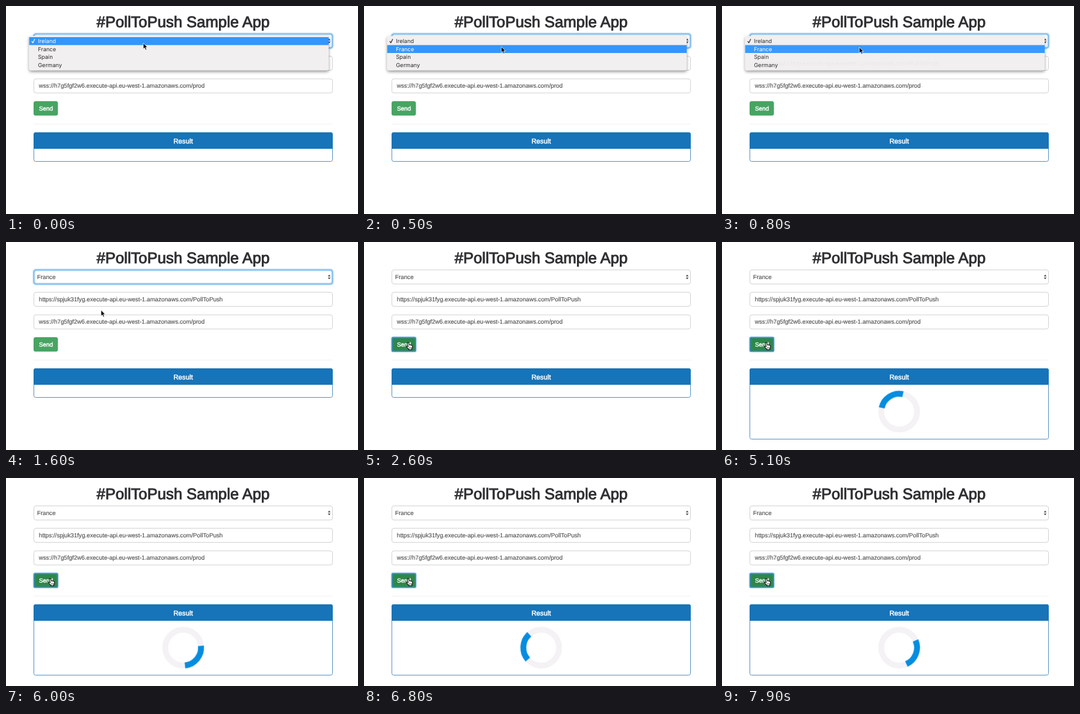
Write an HTML page that moves like this. It is 600 by 354 pixels and loops after 8000 ms.

```html
<!DOCTYPE html>
<html lang="en">
<head>
<meta charset="utf-8">
<title>Sample app</title>
<style>
html, body { margin: 0; width: 100%; height: 100%; overflow: hidden; background: #fff; }
svg { display: block; width: 600px; height: 354px; }
text {
  font: 10.13px "Liberation Sans", Arial, sans-serif; text-rendering: geometricPrecision;
  fill: #4a4a4a; stroke: #4a4a4a; stroke-width: .12px;
}
.title { font-size: 26.25px; fill: #303033; stroke: #303033; stroke-width: 1px; text-anchor: middle; }
.head { font-size: 11.7px; fill: #fff; stroke: #fff; stroke-width: .5px; text-anchor: middle; }
.send { fill: #fff; stroke: #fff; stroke-width: .45px; }
.field { fill: #fff; stroke: #d0d0d0; }
.menu text { font: 9.5px Inter, "Open Sans", sans-serif; fill: #2b2b2b; stroke: none; }
.menu .lit text { fill: #fff; }
.lit rect { fill: #3296fb; }
.lit path { stroke: #fff; }
.tick { fill: none; stroke: #2b2b2b; stroke-width: 1.3; }

/* one-time switches within the 8 s loop */
.step { animation: 8s step-end infinite; }
.ireland { animation-name: ireland; }
.france { animation-name: france; }
.focus { animation-name: focus; }
.hover, .hand { animation-name: enter; }
.arrow { animation-name: leave; }
.ring { animation-name: ring; }
.busy { animation-name: busy; }
@keyframes ireland { 0% { opacity: 1 } 5% { opacity: 0 } to { opacity: 0 } }
@keyframes france { 0% { opacity: 0 } 5% { opacity: 1 } to { opacity: 1 } }
@keyframes focus { 0% { opacity: 1 } 28.75% { opacity: 0 } to { opacity: 0 } }
@keyframes enter { 0% { opacity: 0 } 24.5% { opacity: 1 } to { opacity: 1 } }
@keyframes leave { 0% { opacity: 1 } 24.5% { opacity: 0 } to { opacity: 0 } }
@keyframes ring { 0% { opacity: 0 } 28.75% { opacity: 1 } to { opacity: 1 } }
@keyframes busy { 0% { opacity: 0 } 41.04% { opacity: 1 } to { opacity: 1 } }

.menu { animation: close 8s linear infinite; }
@keyframes close { 0%, 9% { opacity: 1 } 10% { opacity: .96 } 11% { opacity: .9 } 13.75%, to { opacity: 0 } }

.cursor { animation: move 8s ease-in-out infinite; }
@keyframes move {
  0%, 2.5% { transform: translate(234px, 63px) }
  7.5%, 15% { transform: translate(234px, 70px) }
  25.6%, to { transform: translate(75px, 171px) }
}

.arc { transform-origin: 302px 288.7px; animation: spin 2s -.717s linear infinite; }
@keyframes spin { to { transform: rotate(360deg) } }
</style>
</head>
<body>
<svg viewBox="0 0 600 354">
  <defs>
    <filter id="glow" x="-10%" y="-50%" width="120%" height="200%"><feGaussianBlur stdDeviation="1.2"/></filter>
    <filter id="shade" x="-5%" y="-20%" width="110%" height="150%">
      <feDropShadow dx="0" dy="2.5" stdDeviation="2.5" flood-opacity=".42"/>
    </filter>
  </defs>

  <text class="title" x="302" y="36.3">#PollToPush Sample App</text>

  <rect class="field" x="47.5" y="47.5" width="509" height="24" rx="3.5"/>
  <g class="step focus" fill="none">
    <rect x="47.5" y="47.5" width="509" height="24" rx="3.5" stroke="#66afe9" stroke-width="3" opacity=".7" filter="url(#glow)"/>
    <rect x="47.5" y="47.5" width="509" height="24" rx="3.5" stroke="#66afe9"/>
  </g>
  <text x="53" y="63.2">France</text>
  <path d="M548.6 58.6L550.9 55.4L553.2 58.6ZM548.6 60.4L550.9 63.6L553.2 60.4Z" fill="#484848"/>

  <rect class="field" x="47.5" y="85.5" width="509" height="24" rx="3.5"/>
  <text x="56" y="101.3">https://spjuk31fyg.execute-api.eu-west-1.amazonaws.com/PollToPush</text>
  <rect class="field" x="47.5" y="124" width="509" height="24" rx="3.5"/>
  <text x="56" y="139.4">wss://h7g5fgf2w6.execute-api.eu-west-1.amazonaws.com/prod</text>

  <rect x="47" y="162" width="41.5" height="24.5" rx="3.5" fill="#48a463"/>
  <rect class="step hover" x="47" y="162" width="41.5" height="24.5" rx="3.5" fill="#2f8748"/>
  <g class="step ring" fill="none" stroke="#3d92e0">
    <rect x="47.6" y="162.4" width="40.6" height="23.8" rx="2" stroke-width="2.4" opacity=".45" filter="url(#glow)"/>
    <rect x="47.6" y="162.4" width="40.6" height="23.8" rx="2" stroke-width="1.6"/>
  </g>
  <text class="send" x="56.2" y="177.8">Send</text>

  <path d="M47 201H557" stroke="#f0f0f0"/>

  <g fill="#fff" stroke="#4a8dc3">
    <rect x="47.5" y="215.5" width="509" height="49" rx="3"/>
    <rect class="step busy" x="47.5" y="215.5" width="509" height="120" rx="3"/>
  </g>
  <path d="M47 243V218.5Q47 215 50.5 215H553.5Q557 215 557 218.5V243Z" fill="#1774b8"/>
  <text class="head" x="302" y="233.8">Result</text>

  <g class="step busy" fill="none" stroke-width="10">
    <circle cx="302" cy="288.7" r="30.5" stroke="#f4f2f5"/>
    <path class="arc" d="M280.43 267.13A30.5 30.5 0 0 1 323.57 267.13" stroke="#058de0"/>
  </g>

  <g class="menu">
    <path d="M39.5 51H550V106Q550 109.5 546.5 109.5H43Q39.5 109.5 39.5 106Z" fill="#f1eff0" filter="url(#shade)"/>
    <text x="54.5" y="63">Ireland</text>
    <path class="tick" d="M43.8 60L45.8 62.6L49 56.2"/>
    <text x="54.5" y="76.5">France</text>
    <text x="54.5" y="90">Spain</text>
    <text x="54.5" y="103.5">Germany</text>
    <g class="lit step ireland">
      <rect x="39.5" y="53" width="510.5" height="13.5"/>
      <text x="54.5" y="63">Ireland</text>
      <path class="tick" d="M43.8 60L45.8 62.6L49 56.2"/>
    </g>
    <g class="lit step france">
      <rect x="39.5" y="66.5" width="510.5" height="13.5"/>
      <text x="54.5" y="76.5">France</text>
    </g>
  </g>

  <g class="cursor" stroke-linejoin="round">
    <path class="step arrow" d="M0 0V10.2L2.3 8.1L3.9 11.9L5.7 11.1L4.1 7.4H7.2Z" fill="#000" stroke="#fff" stroke-width=".8"/>
    <g class="step hand" fill="#fff" stroke="#111">
      <path stroke-width="1.1"
        d="M-1.2 .8Q0 -.9 1.2 .8L2.3 4.3Q3.4 3.2 4.2 4.4Q5.4 3.6 6 5Q7.4 4.6 7.6 6.2Q8 9 6.6 10.4V12.4H1.2V11.2Q-1 9.2 -2.7 7.2Q-2.6 5.6 -.8 6.4L.4 7.2Z"/>
      <path stroke-width=".6" d="M2.4 8V10.6M4 8V10.6M5.6 8V10.6"/>
    </g>
  </g>
</svg>
</body>
</html>
```
